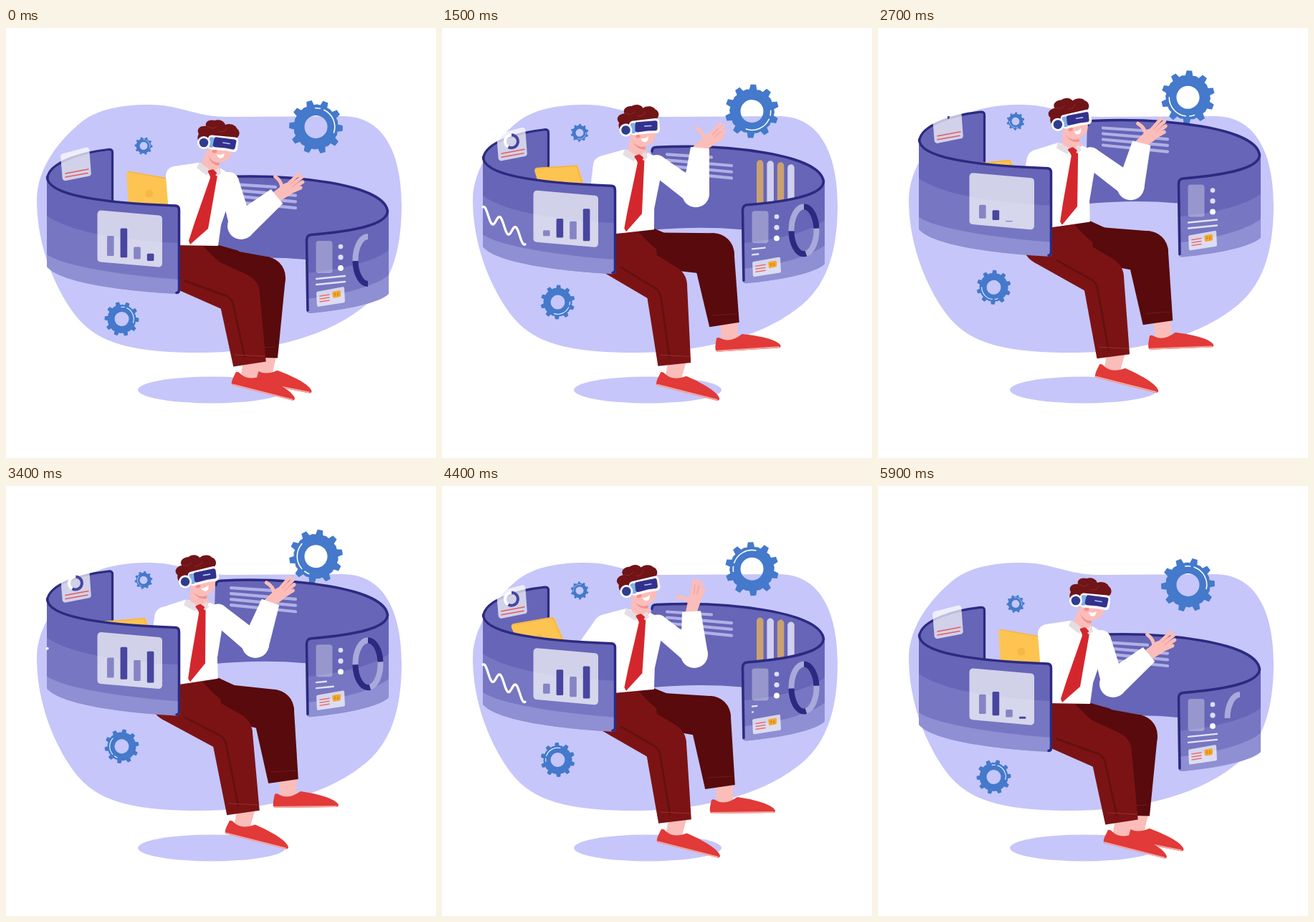
An HTML page with a canvas that plays this animation: 600x600 px, repeating every 6000 ms.

```html
<!DOCTYPE html>
<html lang="en">
<head>
<meta charset="utf-8">
<title>Virtual workspace</title>
<style>
html, body { margin: 0; width: 100%; height: 100%; overflow: hidden; background: #fff; }
canvas { display: block; width: 600px; height: 600px; }
</style>
</head>
<body>
<canvas id="stage" width="600" height="600"></canvas>
<script>
const g = document.getElementById('stage').getContext('2d');
const LOOP = 6000, CYCLE = 3000, STEP = 100;
const C = {
  bg: '#c6c6fa', panel: '#6665b7', rim: '#2c2a80', navy: '#48469f', card: 'rgba(255,255,255,.7)',
  gear: '#4479cb', skin: '#fbbdb9', skinDark: '#f3908e', hair: '#701417', lit: '#7b1315', dark: '#580a0d',
  red: '#e13a38', tie: '#d4272d', gold: '#fdc452'
};

// Poses: key times and the value of each joint channel there
const KEYS = [0, 1000, 2000, 3400, 4400, 5000, 5900];
const POSE = {
  waist: [303, 292, 278, 273, 286, 291],
  lean: [0, -5.6, -8.4, -9.5, -6.2, -5],
  head: [0, -7, -16, -19, -19, -19],
  lapX: [168, 148, 114, 133, 95, 90],
  lapY: [199, 197, 193, 189, 193, 199],
  lapA: [10, 3, -8, -5, -10, -13],
  elbLX: [240, 229, 212, 215, 195, 198],
  elbLY: [262, 250, 215, 215, 235, 231],
  elbRX: [328, 348, 357, 348, 352, 352],
  elbRY: [276, 247, 222, 221, 235, 243],
  wriX: [378, 356, 365, 369, 348, 342],
  wriY: [235, 182, 160, 162, 175, 183],
  hand: [-35, -38, -40, -42, -75, -78],
  kneFX: [325, 313, 313, 315, 312, 312],
  kneFY: [371, 365, 353, 345, 359, 364],
  ankFX: [342, 326, 327, 333, 327, 326],
  ankFY: [467, 472, 461, 454, 466, 472],
  kneBX: [361, 378, 379, 373, 374, 373],
  kneBY: [348, 322, 312, 313, 322, 329],
  ankBX: [358, 394, 394, 387, 388, 385],
  ankBY: [460, 421, 411, 412, 420, 429],
  footB: [12, -3, -3, 0, 0, 0]
};

const rad = d => d * Math.PI / 180;
const clamp = x => Math.max(0, Math.min(1, x));
const ease = x => (1 - Math.cos(Math.PI * clamp(x))) / 2;
const mod = (a, n) => ((a % n) + n) % n;

// Periodic cubic through the key poses, flat at turning points
function sample(values, t) {
  const n = KEYS.length;
  const at = i => values[mod(i, n) % values.length];
  const time = i => KEYS[mod(i, n)] + Math.floor(i / n) * LOOP;
  const slope = i => {
    const a = (at(i) - at(i - 1)) / (time(i) - time(i - 1));
    const b = (at(i + 1) - at(i)) / (time(i + 1) - time(i));
    return a * b <= 0 ? 0 : 2 * a * b / (a + b);
  };
  let i = n - 1;
  while (KEYS[i] > t) i--;
  const h = time(i + 1) - time(i), u = (t - time(i)) / h, v = 1 - u;
  return at(i) * (1 + 2 * u) * v * v + slope(i) * h * u * v * v +
    at(i + 1) * u * u * (3 - 2 * u) - slope(i + 1) * h * u * u * v;
}

// How far a chart part has been drawn and wiped, repeating every CYCLE
function trim(t, up, upFor, down, downFor) {
  const q = mod(t - up, CYCLE);
  return [ease(q / upFor), ease((q - mod(down - up, CYCLE)) / downFor)];
}
function level(...args) {
  const [drawn, wiped] = trim(...args);
  return drawn - wiped;
}

function fill(d, color) { g.fillStyle = color; g.fill(new Path2D(d)); }
function stroke(d, color, w) {
  g.strokeStyle = color; g.lineWidth = w; g.lineCap = g.lineJoin = 'round';
  g.stroke(new Path2D(d));
}
function disc(x, y, rx, ry, color) {
  g.fillStyle = color; g.beginPath(); g.ellipse(x, y, rx, ry, 0, 0, 7); g.fill();
}
function box(x, y, w, h, r, color) {
  g.fillStyle = color; g.beginPath(); g.roundRect(x, y, w, h, r); g.fill();
}
function card(pts, r, color) {
  const n = pts.length, a = pts[n - 1], b = pts[0];
  g.beginPath();
  g.moveTo((a[0] + b[0]) / 2, (a[1] + b[1]) / 2);
  pts.forEach((p, i) => g.arcTo(...p, ...pts[(i + 1) % n], r));
  g.closePath(); g.fillStyle = color; g.fill();
}
// Tapered limb, round at its start and flat at its end
function limb(x1, y1, w1, x2, y2, w2, color) {
  const a = Math.atan2(y2 - y1, x2 - x1), sx = -Math.sin(a) / 2, sy = Math.cos(a) / 2;
  g.fillStyle = color;
  g.beginPath();
  g.moveTo(x1 + sx * w1, y1 + sy * w1); g.lineTo(x2 + sx * w2, y2 + sy * w2);
  g.lineTo(x2 - sx * w2, y2 - sy * w2); g.lineTo(x1 - sx * w1, y1 - sy * w1);
  g.fill();
  disc(x1, y1, w1 / 2, w1 / 2, color);
}
function group(x, y, deg, draw) {
  g.save(); g.translate(x, y); g.rotate(rad(deg)); draw(); g.restore();
}

function gear(x, y, r, hole, deg) {
  group(x, y, deg, () => {
    const n = 10, s = 2 * Math.PI / n;
    g.beginPath();
    for (let i = 0; i < n; i++)
      for (const [k, f] of [[-.27, .82], [-.16, 1], [.16, 1], [.27, .82], [.5, .84]]) {
        const a = (i + .5 + k) * s - Math.PI / 2;
        g.lineTo(r * f * Math.cos(a), r * f * Math.sin(a));
      }
    g.closePath();
    g.moveTo(hole, 0); g.arc(0, 0, hole, 0, 7);
    g.fillStyle = C.gear; g.fill('evenodd');
    g.strokeStyle = '#fff'; g.lineWidth = r / 24; g.lineCap = 'round';
    for (const [a, b] of [[-95, -80], [-68, 15]]) {
      g.beginPath(); g.arc(0, 0, r * .7, rad(a), rad(b)); g.stroke();
    }
  });
}

// Ring made of [degrees, colour] parts laid anticlockwise from the top
function ring(x, y, rx, ry, w, [drawn, wiped], parts) {
  let from = 0;
  g.lineWidth = w; g.lineCap = 'butt';
  for (const [size, color] of parts) {
    const a = Math.max(from, wiped * 360), b = Math.min(from += size, drawn * 360);
    if (b <= a) continue;
    g.strokeStyle = color;
    g.beginPath(); g.ellipse(x, y, rx, ry, 0, rad(-90 - a), rad(-90 - b), true); g.stroke();
  }
}

function face(d, bands, rim) {
  fill(d, C.panel);
  g.save(); g.clip(new Path2D(d));
  bands.forEach((b, i) => fill(b, i ? 'rgba(200,200,250,.3)' : 'rgba(200,200,250,.17)'));
  g.restore();
  stroke(rim, C.rim, 3.5);
}

function backdrop() {
  fill('M200 107C245 107 262 124 310 124L470 123C530 123 552 180 552 247C552 312 537 362 495 392C440 435 350 453 270 453C190 453 135 444 103 408C78 380 43 315 43 240C43 195 75 155 108 129C132 112 165 107 200 107Z', C.bg);
  disc(287, 505, 103, 18.5, C.bg);
}

function ringBack(t) {
  fill('M292 212Q292 208 297 208C400 203 528 218 533 256V330L418 323C375 319 330 320 289 324Z', C.panel);
  stroke('M293 214Q293 208 299 208C400 203 528 218 532.500 256', C.rim, 3.5);
  for (let i = 0; i < 4; i++)
    stroke(`M314 ${218 + 8 * i}L${i ? 404 : 376} ${i ? 225 + 8.7 * i : 222}`, 'rgba(205,205,248,.72)', 4.2);
  [226, 227, 229, 232].forEach((top, i) => {
    const h = (290 - top) * level(t, 350 + 150 * i, 500, 1880 + 150 * i, 500);
    if (h > 1) box(439 + 14.4 * i, 290 - h, 9.5, h, [5, 5, 0, 0], i % 2 ? '#d0d0ef' : '#c9a270');
  });
}

function ringFront(t) {
  face('M418 296Q418 289 425 289C480 284 532 276 534 256V371C520 384 475 393 425 398Q419 398 419 393Z',
    ['M418 342C470 337 515 325 534 310V400H418Z', 'M418 378C470 373 515 360 534 345V400H418Z'],
    'M421 394L419.5 296Q419.5 289 426 288.500C480 284 531 276 532.500 256');
  box(432.5, 297, 23, 45, 4, 'rgba(255,255,255,.32)');
  [305, 320, 335].forEach((y, i) => disc(467, y, 3.3 + i * .3, 3.3 + i * .3, i < 2 ? '#dedef6' : '#fff'));
  const light = '#a9a9da';
  ring(505, 324, 17.5, 33, 8, trim(t, 2700, 600, 1500, 750),
    [[92, light], [98, C.rim], [85, light], [85, C.rim]]);
  [0, 1].forEach(i => {
    const k = level(t, 1270 + 80 * i, 500, 100 + 80 * i, 500), y = 350 + 8 * i;
    if (k > .02) stroke(`M433 ${y}l${40 * k} ${-4 * k}`, '#e3e3f8', 2.4);
  });
  card([[433, 368], [472, 361], [473, 383], [434, 389]], 2, C.card);
  for (let i = 0; i < 3; i++) stroke(`M438 ${374 + 4 * i}l13 -2`, '#ee6c6c', 1.6);
  card([[455, 368], [467, 366], [467, 375], [456, 377]], 2, '#f5a72c');
  stroke('M459 370v3M463 370v3', '#c9761a', 1.2);
}

function deskBack(t) {
  fill('M57 210C60 185 110 172 145 169Q150 168 150 174V250L57 240Z', C.panel);
  stroke('M57.500 210C60 186 110 173 143 169.500Q148.500 169 148.500 174V244', C.rim, 3.2);
  card([[76, 176], [116, 165.500], [119, 206], [79, 214]], 4, C.card);
  stroke('M83 203L115 197M83 208L114 202.500', '#e85a5c', 1.5);
  ring(97, 186, 9, 9, 4, trim(t, 0, 420, 2100, 700), [[150, '#fff'], [210, C.navy]]);
}

function deskFront(t) {
  face('M57 208C58 233 130 244 238 248Q243 248 243 254V366Q243 371 238 371C150 366 75 354 57 333Z',
    ['M57 262C90 285 160 296 243 300V380H57Z', 'M57 316C80 332 160 345 243 351V380H57Z'],
    'M57.500 208C58 233 130 244 237 248Q241.500 248.500 241.500 254V365Q241.500 369.500 238 369.500');
  const [to, from] = trim(t, 350, 600, 1800, 700);
  if (to - from > .005) {
    let d = '';
    for (let x = 57 + 59 * from; x <= 57 + 59 * to; x += .5)
      d += `${d ? 'L' : 'M'}${x} ${293 + .64 * (x - 70) + 8.5 * Math.cos((x - 70) * Math.PI / 11)}`;
    stroke(d, '#fff', 3.3);
  }
  card([[127.500, 254], [218, 262], [218, 334], [127.500, 326]], 5, C.card);
  [28, 45, 29, 45].forEach((full, i) => {
    const h = full * level(t, 2270 + 170 * i, 700, 1050 + 140 * i, 700);
    if (h > 1)
      box(141 + 18.6 * i, 318 + 2.300 * i - h, 9.6, h, Math.min(1.5, h / 2), i % 2 ? C.navy : '#8684c4');
  });
}

function laptop(p) {
  group(p.lapX, p.lapY, p.lapA, () => {
    card([[14, 44], [90, 42], [101, 46], [100, 56], [20, 60]], 2, '#f5b440');
    card([[0, 0], [62, 0], [73, 46], [11, 46]], 4, C.gold);
    stroke('M3 1H60L70 42', '#f3b040', 1.2);
    disc(37, 26, 5.5, 5.5, '#f6b844');
  });
}

function shoe(x, y, deg) {
  group(x, y, deg, () => {
    limb(1, -6, 25, 2, 24, 22, C.skin);
    fill('M-19 28L-17 18Q-14 16 -10 19Q2 26 19 14Q34 16 48 20Q69 26 72 33Q72 36 68 36L-17 37Q-20 36 -19 28Z', C.red);
    stroke('M-17 36L69 35', '#f3a8a3', 2);
  });
}

function torsoPoint(p, x, y) {
  const a = rad(p.lean), dx = x - 265, dy = y - 303;
  return [265 + dx * Math.cos(a) - dy * Math.sin(a), p.waist + dx * Math.sin(a) + dy * Math.cos(a)];
}

function legs(p) {
  const w = p.waist, hip = torsoPoint(p, 297, 303);
  shoe(p.ankBX + 5, p.ankBY, p.footB);
  limb(280, w + 25, 48, p.kneBX, p.kneBY, 58, C.dark);
  limb(p.kneBX, p.kneBY, 58, p.ankBX, p.ankBY, 42, C.dark);
  stroke(`M${p.ankBX - 17} ${p.ankBY - 13}l34 -2`, '#77191b', 1);
  shoe(p.ankFX, p.ankFY, 15);
  fill(`M${torsoPoint(p, 230, 303)}L${hip}L300 ${w + 34}L238 ${w + 55}Z`, C.lit);
  fill(`M274 ${w}L${hip}L325 ${w + 8}L310 ${w + 33}Q292 ${w + 20} 274 ${w}Z`, C.dark);
  limb(232, w + 26, 60, p.kneFX, p.kneFY, 58, C.lit);
  limb(p.kneFX, p.kneFY, 58, p.ankFX - 2, p.ankFY + 2, 46, C.lit);
  stroke(`M250 ${w + 50}L${p.kneFX - 17} ${p.kneFY + 3}Q${p.kneFX - 8} ${p.kneFY + 8} ${p.kneFX - 7} ${p.kneFY + 20}L${p.ankFX - 9} ${p.ankFY - 8}`, '#64100f', 3);
  stroke(`M${p.ankFX - 22} ${p.ankFY - 11}l41 2`, '#95302f', 1);
}

function head() {
  fill('M279 172L296 184L299 198L288 204L272 193Z', C.skin);
  fill('M282 178Q288 189 298 188L297 192Q286 191 282 178Z', C.skinDark);
  fill('M281 150V168C282 182 290 189 300 187C311 186 316 179 316 168L315 150Z', C.skin);
  disc(291, 172, 3.5, 2.500, '#f58f8c');
  fill('M294 176Q300 178 305 175Q304 182 299 182Q295 181 294 176Z', '#fff');
  fill('M272 163C266 157 267 151 269 148C265 141 271 136 279 137C277 130 285 127 291 129C297 127 304 129 306 135C313 132 321 136 322 140C328 144 326 153 320 154L288 153L284 166Z', C.hair);
  stroke('M281 137Q287 142 293 138M296 144Q304 147 308 140', '#8a2426', 1.2);
  stroke('M276 160L287 157', '#8fbdf0', 9);
  card([[282, 149], [325, 153], [322, 174], [305, 171], [282, 169]], 5, '#fff');
  card([[284, 152], [291, 152.500], [289, 167], [283, 166.500]], 2, '#7fb0ea');
  card([[291, 152], [322, 156], [319, 170], [306, 167.500], [288, 166]], 3, '#34318c');
  stroke('M303 160L312 161.500', '#a9c9f6', 1.6);
  disc(276, 160, 9, 9, '#fff');
  disc(276, 160, 6.3, 6.3, '#2f3d8f');
}

function hand(p) {
  group(p.wriX, p.wriY, p.hand, () => {
    limb(-4, 0, 15, 14, 0, 17, C.skin);
    disc(16, 0, 11, 9, C.skin);
    stroke('M11 -4Q18 -12 14 -24', C.skin, 5);
    stroke('M22 -5L43 -8M22 -1L44 -2M21 3L41 4M19 6L34 9', C.skin, 5);
    stroke('M25 -3L37 -5M25 1.500L37 1', C.skinDark, .8);
  });
}

function man(p) {
  const at = (x, y) => torsoPoint(p, x, y);
  legs(p);
  disc(p.elbLX + 4, p.elbLY, 8, 7, C.skin);
  limb(...at(236, 206), 26, p.elbLX, p.elbLY, 25, '#fff');
  fill(`M${at(268, 188)}L${at(234, 193)}L${at(224, 208)}L${at(236, 303)}L${at(296, 304)}L${at(300, 275)}L${at(322, 210)}L${at(300, 196)}Z`, '#fff');
  group(265, p.waist, p.lean, () => {
    g.translate(-265, -303);
    fill('M284 200L291 198L295 206L282 280L257 302L255 297L263 272L285 209Z', C.tie);
  });
  hand(p);
  limb(...at(311, 215), 28, p.elbRX, p.elbRY, 32, '#fff');
  limb(p.elbRX, p.elbRY, 38, p.wriX, p.wriY, 26, '#fff');
  group(...at(292, 178), p.head, () => { g.translate(-292, -178); head(); });
  group(265, p.waist, p.lean, () => {
    g.translate(-265, -303);
    fill('M270 187L266 195L280 206L286 199Z', '#e6dde3');
    fill('M298 195L300 203L294 207L288 200Z', '#e6dde3');
    card([[281, 199], [289, 197], [295, 203], [286, 209]], 2, C.tie);
  });
}

function lifted(dy, draw, t) {
  g.save(); g.translate(0, dy); draw(t); g.restore();
}

function draw(t) {
  const bob = (1 - Math.cos(2 * Math.PI * (t + 40) / LOOP)) / 2, turn = 360 * t / LOOP + 3;
  const p = {};
  for (const k in POSE) p[k] = sample(POSE[k], t);
  g.clearRect(0, 0, 600, 600);
  backdrop();
  gear(192, 164.500 - 35 * bob, 12.5, 5.5, turn);
  gear(161.500, 406 - 45 * bob, 24, 10, turn);
  gear(432.500, 138 - 42 * bob, 37.500, 16, turn);
  lifted(-80 * bob, ringBack, t);
  lifted(-53.300 * bob, deskBack, t);
  laptop(p);
  man(p);
  lifted(-53.300 * bob, deskFront, t);
  lifted(-80 * bob, ringFront, t);
}

function tick() {
  draw(Math.floor(performance.now() % LOOP / STEP) * STEP);
  requestAnimationFrame(tick);
}
tick();
</script>
</body>
</html>
```
